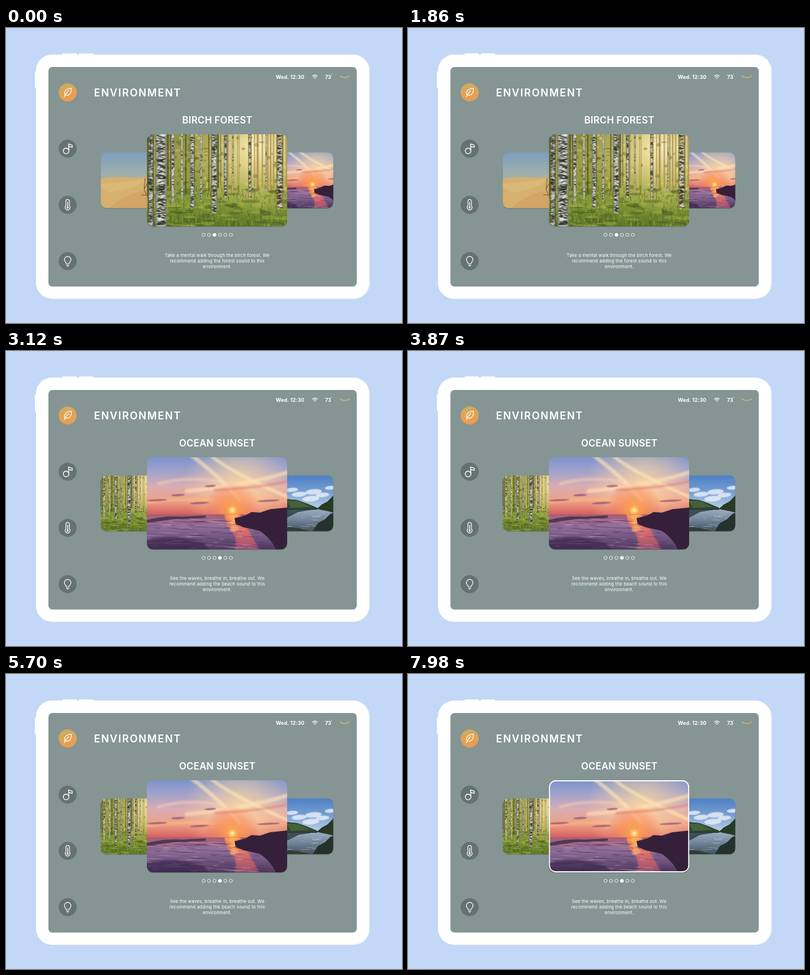
Write an HTML page with a canvas that moves like this. It is 700x522 px and loops after 8000 ms.

```html
<!DOCTYPE html>
<html lang="en">
<head>
<meta charset="utf-8">
<title>Environment</title>
<style>
  html, body { margin: 0; width: 100%; height: 100%; overflow: hidden; background: #c3d8f6; }
  canvas { display: block; width: 700px; height: 522px; }
</style>
</head>
<body>
<canvas id="stage"></canvas>
<script>
const LOOP = 8000, SLIDE = [2560, 3060], BORDER = [6500, 6650];
const CARD_W = 248, CARD_H = 163, FONT = 'Inter, "Open Sans", sans-serif';
const stage = document.getElementById('stage');
const dpr = window.devicePixelRatio || 1;
stage.width = 700 * dpr;
stage.height = 522 * dpr;
const ctx = stage.getContext('2d');

const clamp = v => Math.max(0, Math.min(1, v));
const mix = (a, b, k) => a + (b - a) * k;
const ease = k => k * k * (3 - 2 * k);
const progress = (t, [from, to]) => ease(clamp((t - from) / (to - from)));

function randomFrom(seed) {
  return () => (seed = (seed * 16807) % 2147483647) / 2147483647;
}

function gradient(c, line, ...colors) {
  const g = c.createLinearGradient(...line);
  colors.forEach((color, i) => g.addColorStop(i / (colors.length - 1), color));
  return g;
}

function glow(c, x, y, r, inner, outer) {
  const g = c.createRadialGradient(x, y, 0, x, y, r);
  g.addColorStop(0, inner);
  g.addColorStop(1, outer);
  c.fillStyle = g;
  c.fillRect(x - r, y - r, r * 2, r * 2);
}

function area(c, y0, y1, ...colors) {
  c.fillStyle = gradient(c, [0, y0, 0, y1], ...colors);
  c.fillRect(0, y0, CARD_W, y1 - y0);
}

function shape(c, path, color) {
  c.fillStyle = color;
  c.fill(new Path2D(path));
}

function ellipse(c, x, y, rx, ry, color, angle = 0) {
  c.fillStyle = color;
  c.beginPath();
  c.ellipse(x, y, rx, ry, angle, 0, Math.PI * 2);
  c.fill();
}

function desert(c) {
  area(c, 0, 82, '#7b9fc0', '#93aab2', '#aab3a5');
  shape(c, 'M0 84Q60 70 110 73T248 66V163H0Z', '#d6b06e');
  shape(c, 'M20 92Q100 88 164 78Q150 105 60 118Z', '#dab878');
  shape(c, 'M60 163Q110 120 164 112T248 92V163Z', '#d3a566');
  c.strokeStyle = '#6d4c38';
  c.lineWidth = 1.5;
  c.stroke(new Path2D('M166 75L163 108L170 125L155 124M163 108L171 92'));
}

function trunk(c, rnd, x, width, bottom, light = '#bdbfaf', dark = '#6c6b55') {
  const left = x - width / 2;
  c.fillStyle = gradient(c, [left, 0, left + width, 0], dark, light, light, dark);
  c.fillRect(left, 0, width, bottom);
  for (let i = 0; i < bottom * width / 14; i++) {
    const w = width * (.1 + rnd() * .35);
    ellipse(c, left + w + rnd() * (width - 2 * w), rnd() * (bottom - 2), w, .5 + rnd() * 1.2,
      rnd() < .7 ? 'rgba(45,47,33,.65)' : 'rgba(235,238,230,.6)', rnd() - .5);
  }
}

function birch(c) {
  const rnd = randomFrom(27);
  area(c, 0, 163, '#8f9145', '#a09e4c', '#93993f', '#7f9436', '#5d772a');
  glow(c, 196, 22, 125, 'rgba(255,243,196,1)', 'rgba(240,215,120,0)');
  for (let i = 0; i < 190; i++) {
    const x = rnd() * CARD_W, shade = rnd() < .8 - x / 400;
    ellipse(c, x, rnd() * 98, 1.5 + rnd() * 4, 1 + rnd() * 3,
      shade ? 'rgba(88,101,32,.4)' : 'rgba(240,214,112,.45)');
  }
  for (let i = 0; i < 36; i++) {
    const x = rnd() * CARD_W;
    c.fillStyle = x > 140 ? 'rgba(160,130,68,.6)' : 'rgba(70,73,35,.7)';
    c.fillRect(x, 0, 1 + rnd() * 2.5, 88 + rnd() * 20);
  }
  for (let i = 0; i < 90; i++) {
    ellipse(c, rnd() * CARD_W, 96 + rnd() * 67, 5 + rnd() * 12, 1 + rnd() * 3,
      rnd() < .5 ? 'rgba(177,184,72,.35)' : 'rgba(56,79,24,.35)');
  }
  for (let i = 0; i < 420; i++) {
    const x = rnd() * CARD_W, y = 97 + rnd() * 68;
    c.strokeStyle = rnd() < .5 ? 'rgba(176,187,75,.5)' : 'rgba(56,80,25,.5)';
    c.beginPath();
    c.moveTo(x, y);
    c.lineTo(x + rnd() * 4 - 2, y - 3 - rnd() * 6);
    c.stroke();
  }
  for (const [x, w, bottom] of [[46, 6, 122], [62, 4, 115], [96, 4, 118], [139, 6, 112],
    [152, 3, 104], [182, 6, 114], [211, 3, 103], [80, 8, 131], [119, 11, 140], [235, 12, 132]]) {
    trunk(c, rnd, x, w, bottom, x > 145 ? '#c8b67e' : '#b8baa6');
  }
  trunk(c, rnd, 7, 10, 163, '#93957f', '#4b4d38');
  trunk(c, rnd, 25, 20, 163, '#c9cbc6', '#77796c');
}

function streak(c, path, color, width) {
  c.strokeStyle = color;
  c.lineWidth = width;
  c.stroke(new Path2D(path));
}

function ocean(c) {
  const rnd = randomFrom(81);
  area(c, 0, 103, '#7d94cd', '#a4a3cb', '#d9adb3', '#eda287', '#d55a5c');
  glow(c, 165, 52, 100, 'rgba(255,222,160,.85)', 'rgba(255,210,160,0)');
  c.lineCap = 'round';
  c.filter = 'blur(3px)';
  streak(c, 'M78 -4Q130 35 163 75', 'rgba(255,231,187,.65)', 7);
  streak(c, 'M112 -4Q145 25 248 70', 'rgba(255,232,180,.65)', 6);
  streak(c, 'M248 27Q170 51 70 60', 'rgba(255,226,180,.65)', 7);
  streak(c, 'M248 43Q190 55 120 58', 'rgba(218,115,120,.55)', 4);
  streak(c, 'M20 47Q70 33 130 43', 'rgba(255,214,188,.5)', 5);
  streak(c, 'M0 80Q75 70 150 78', 'rgba(255,190,125,.55)', 5);
  c.filter = 'blur(1.5px)';
  for (const [x, y, w] of [[55, 67, 12], [112, 51, 10], [18, 76, 18], [93, 81, 17], [215, 77, 20]]) {
    ellipse(c, x, y, w, 1.8, 'rgba(142,78,112,.75)', -.05);
  }
  c.filter = 'none';
  glow(c, 151, 94, 50, 'rgba(255,175,70,1)', 'rgba(240,70,65,0)');
  glow(c, 151, 94, 9, 'rgba(255,247,190,1)', 'rgba(255,210,110,0)');
  area(c, 101, 163, '#a75f74', '#93719a', '#715580', '#51385f');
  c.filter = 'blur(2px)';
  shape(c, 'M137 101H164L199 163H155Q163 140 143 123Z',
    gradient(c, [0, 101, 0, 163], '#ff9851', '#d96a6b', '#97516e'));
  c.filter = 'none';
  for (let i = 0; i < 110; i++) {
    const x = rnd() * 210, y = 107 + rnd() * 54, w = 4 + rnd() * 16;
    ellipse(c, x, y, w, .7, rnd() < .5 ? 'rgba(204,152,177,.45)' : 'rgba(65,43,91,.45)', .04);
  }
  for (let y = 103; y < 132; y += 3) {
    ellipse(c, 150 + rnd() * 5, y, 4 + rnd() * 5, 1, 'rgba(255,209,115,.7)');
  }
  shape(c, 'M0 111Q30 103 63 105L104 103V107L45 110L0 116Z', '#523652');
  c.filter = 'blur(3px)';
  shape(c, 'M-5 148Q45 133 100 151L115 168H-5Z', 'rgba(55,36,76,.6)');
  c.filter = 'none';
  shape(c, 'M155 108L174 103L185 97L200 98L218 92L248 89V163H228Q219 143 199 130L171 124L157 118Z', '#35203a');
}

function lake(c) {
  const rnd = randomFrom(14);
  area(c, 0, 98, '#4f80c4', '#779fd4', '#bdd2e8');
  c.filter = 'blur(2px)';
  for (const [x, y, r] of [[91, 42, 18], [112, 55, 22], [154, 48, 24], [180, 57, 20], [146, 68, 25], [204, 36, 17]]) {
    ellipse(c, x, y, r, r * .33, 'rgba(236,242,248,.8)', -.08);
  }
  c.filter = 'none';
  area(c, 96, 163, '#9eafc4', '#72869a', '#42535d');
  shape(c, 'M0 65Q50 59 76 69L107 72L135 82L164 94V100H0Z', '#304632');
  shape(c, 'M76 73L110 75L145 92L88 95Z', '#45613a');
  shape(c, 'M163 98L178 85L195 76L213 57L248 45V119L198 105Z', '#263a25');
  shape(c, 'M0 98H165L109 107L76 124L0 135Z', 'rgba(35,51,52,.75)');
  for (let i = 0; i < 30; i++) {
    ellipse(c, 60 + rnd() * 150, 102 + rnd() * 58, 5 + rnd() * 10, .6, 'rgba(186,204,221,.5)');
  }
  shape(c, 'M152 163L166 140L188 128L204 112L248 102V163Z', '#25312a');
  shape(c, 'M60 163L82 151L115 155L145 163Z', '#303d36');
}

const scenes = [
  { draw: desert },
  { draw: birch, title: 'BIRCH FOREST', lines: ['Take a mental walk through the birch forest. We',
    'recommend adding the forest sound to this', 'environment.'] },
  { draw: ocean, title: 'OCEAN SUNSET', lines: ['See the waves, breathe in, breathe out. We',
    'recommend adding the beach sound to this', 'environment.'] },
  { draw: lake }
];
for (const scene of scenes) {
  scene.image = document.createElement('canvas');
  scene.image.width = CARD_W * 2;
  scene.image.height = CARD_H * 2;
  const c = scene.image.getContext('2d');
  c.scale(2, 2);
  scene.draw(c);
}

function box(x, y, w, h, r) {
  ctx.beginPath();
  ctx.roundRect(x, y, w, h, r);
}

function text(value, x, y, size, weight, spacing = 0, align = 'left') {
  ctx.font = `${weight} ${size}px ${FONT}`;
  ctx.letterSpacing = spacing + 'px';
  ctx.textAlign = align;
  ctx.fillStyle = '#fff';
  ctx.fillText(value, x, y);
}

function line(path, width = 1.4, color = '#fff') {
  ctx.strokeStyle = color;
  ctx.lineWidth = width;
  ctx.lineCap = ctx.lineJoin = 'round';
  ctx.stroke(new Path2D(path));
}

function drawDevice() {
  ctx.fillStyle = '#c3d8f6';
  ctx.fillRect(0, 0, 700, 522);
  ctx.fillStyle = '#fff';
  box(51, 77, 4, 29, 1); ctx.fill();
  box(100, 45, 25, 4, 1); ctx.fill();
  box(129, 45, 25, 4, 1); ctx.fill();
  ctx.fillStyle = '#dfe9f8';
  box(54, 47.5, 589, 432, 28); ctx.fill();
  ctx.fillStyle = '#fff';
  box(53, 47, 589, 432, 28); ctx.fill();
  ctx.fillStyle = '#859594';
  box(75, 69, 545, 388.5, 7); ctx.fill();
}

function drawStatus() {
  text('Wed. 12:30', 477, 90, 9, 700, .1);
  text('73', 564, 90, 9, 700);
  line('M575.5 81.5V82.5', .8);
  line('M541.7 85Q546 81.2 550.3 85M543.3 87Q546 84.7 548.7 87', 1.1);
  ellipse(ctx, 546, 89, .9, .9, '#fff');
  line('M591 85.2Q599 90.3 607 85.2', 2.2, gradient(ctx, [590, 0, 608, 0], '#c2a870', '#b9b08a', '#c2a870'));
}

function drawMenu() {
  const orange = gradient(ctx, [106, 98, 112, 130], '#cdab61', '#e0a457', '#ee9a52');
  [114, 213.5, 313, 412.5].forEach((y, i) => ellipse(ctx, 109, y, 16, 16, i ? '#667272' : orange));
  line('M104.5 119.5C101 112.5 106 107 115.5 106.7C116 115.5 112 120.5 105 118.5M103 122C105 117.5 107.5 113.5 111 110.8', 1.2);
  line('M111.2 216.5A5 5 0 1 1 106 212.5Q109 212.5 111.2 216.5L110.5 205.2L117 207.3V211.2L111 209.5', 1.4);
  line('M105.8 315V306.5A3.2 3.2 0 0 1 112.2 306.5V315A4.2 4.2 0 1 1 105.8 315Z', 1.2);
  line('M109 308V317', 1.4);
  ellipse(ctx, 109, 318, 1.8, 1.8, '#fff');
  line('M106.5 417C106.5 414.5 103.2 413.5 103.2 410A5.8 5.8 0 0 1 114.8 410C114.8 413.5 111.5 414.5 111.5 417ZM106.8 419.5H111.2M108 421.3H110', 1.2);
}

function drawCard(scene, offset, border) {
  const d = Math.min(1, Math.abs(offset));
  const w = mix(CARD_W, 106, d), h = mix(CARD_H, 98.5, d);
  const x = 373 + 152.5 * Math.sign(offset) * d - w / 2, y = 269.5 - h / 2;
  const radius = mix(11, 10, d), imageW = CARD_W * h / CARD_H;
  ctx.save();
  ctx.globalAlpha = clamp(2 - Math.abs(offset));
  ctx.fillStyle = 'rgba(50,60,58,.35)';
  box(x, y + 1, w, h, radius); ctx.fill();
  box(x, y, w, h, radius);
  ctx.clip();
  ctx.drawImage(scene.image, x + (w - imageW) / 2, y, imageW, h);
  ctx.restore();
  if (d === 0 && border > 0) {
    ctx.globalAlpha = border;
    ctx.strokeStyle = '#fff';
    ctx.lineWidth = 1.8;
    box(x + 1.2, y + 1, w - 2, h - 2, radius); ctx.stroke();
    ctx.globalAlpha = 1;
  }
}

function drawCarousel(t) {
  const position = 1 + progress(t, SLIDE), border = progress(t, BORDER);
  scenes.map((scene, i) => ({ scene, offset: i - position }))
    .sort((a, b) => Math.abs(b.offset) - Math.abs(a.offset))
    .forEach(({ scene, offset }) => drawCard(scene, offset, border));

  scenes.forEach((scene, i) => {
    ctx.globalAlpha = clamp(1 - Math.abs(i - position));
    if (!scene.title || !ctx.globalAlpha) return;
    text(scene.title, 373.5, 169, 16.7, 600, .25, 'center');
    scene.lines.forEach((row, n) => text(row, 373.3, 404.7 + n * 10.3, 8, 400, .12, 'center'));
  });
  ctx.globalAlpha = 1;

  for (let i = 0; i < 6; i++) {
    ctx.beginPath();
    ctx.arc(349.2 + i * 9.65, 366, 2.8, 0, Math.PI * 2);
    ctx.strokeStyle = ctx.fillStyle = '#fff';
    ctx.lineWidth = .8;
    ctx.stroke();
    ctx.globalAlpha = clamp(1 - Math.abs(i - position - 1));
    ctx.fill();
    ctx.globalAlpha = 1;
  }
}

function render() {
  const t = performance.now() % LOOP;
  ctx.setTransform(dpr, 0, 0, dpr, 0, 0);
  drawDevice();
  text('ENVIRONMENT', 155.5, 120.8, 18.2, 600, 1.65);
  drawStatus();
  drawMenu();
  drawCarousel(t);
  requestAnimationFrame(render);
}
render();
</script>
</body>
</html>
```
